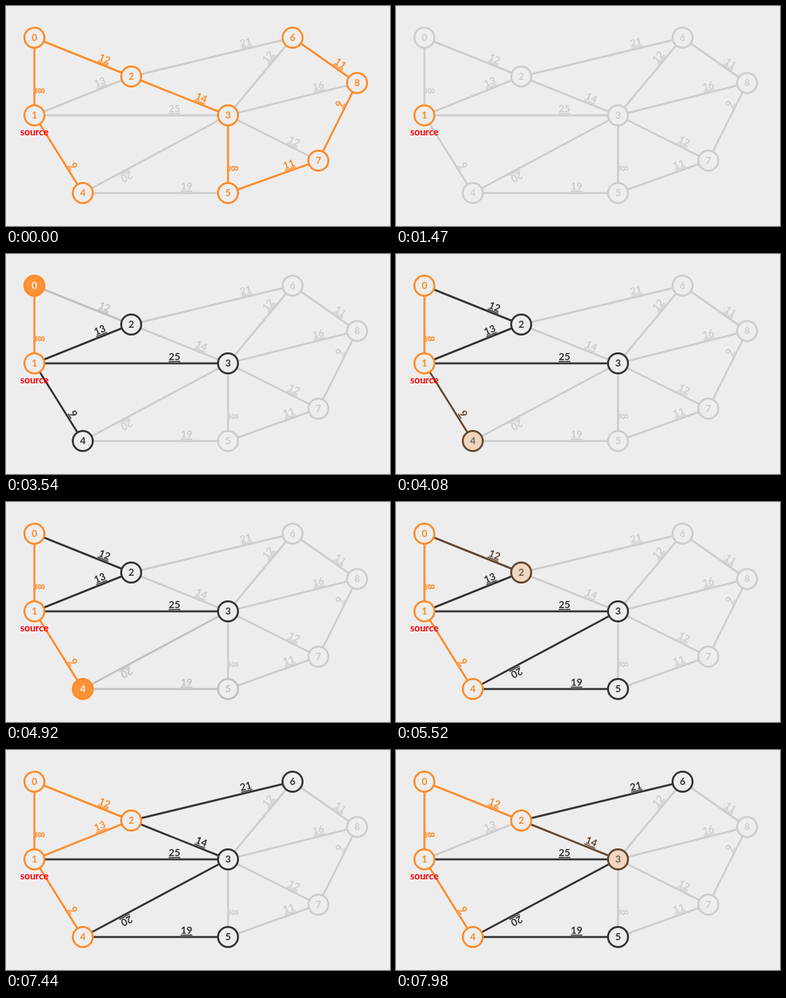
An HTML page that plays this animation: 595 px wide and 340 px high, repeating every 8 s.

```html
<!DOCTYPE html>
<html lang="en">
<head>
<meta charset="utf-8">
<title>Minimum spanning tree</title>
<style>
  html, body { margin: 0; width: 100%; height: 100%; overflow: hidden; background: #ededed; }
  svg { display: block; width: 595px; height: 340px; }
  text { font: 700 15px Lato, "Open Sans", sans-serif; text-anchor: middle; }
  line, circle { stroke-width: 3; }
  .edge line { stroke: currentColor; }
  .edge text { fill: currentColor; font-size: 15.5px; text-decoration: underline; }
  .source { fill: #f00; }
</style>
</head>
<body>
<svg id="stage" viewBox="0 0 595 340"></svg>
<script>
const LOOP = 8000, TICK = 30;
const GREY = [204, 204, 204], DARK = [51, 51, 51], ORANGE = [255, 138, 39];
const PAPER = [237, 237, 237], WHITE = [255, 255, 255];

// Each look is [outline, fill, ink]; edges use the outline only.
const LOOKS = {
  off: [GREY, PAPER, GREY],
  on: [DARK, PAPER, DARK],
  done: [ORANGE, PAPER, ORANGE],
  hot: [ORANGE, ORANGE, WHITE]
};

const NODES = [[44, 49], [44, 169], [194, 109], [344, 169], [119, 289],
               [344, 289], [444, 49], [484, 239], [544, 119]];

// Direction matters: the weight sits three quarters of the way along, on the left.
const EDGES = {
  '01': 8, '02': 12, '12': 13, '13': 25, '14': 9, '23': 14, '26': 21, '34': 20,
  '35': 8, '36': 12, '37': 12, '38': 16, '45': 19, '57': 11, '68': 11, '78': 9
};
const TREE = ['01', '02', '14', '23', '35', '57', '68', '78'];

// [first change, last change, { look: parts }]
const BEATS = [
  [1470, 1470, { off: Object.keys(EDGES).join(' ') + ' 0 2 3 4 5 6 7 8' }],
  [1980, 2310, { on: '01 12 13 14 0 2 3 4' }],
  [2550, 2820, { done: '01', hot: '0' }],
  [3540, 3870, { done: '0', on: '02' }],
  [4050, 4260, { done: '14', hot: '4' }],
  [4920, 5280, { done: '4', on: '34 45 5' }],
  [5490, 5730, { done: '02', hot: '2' }],
  [6420, 6750, { done: '2', on: '26 23 6' }],
  [6990, 7230, { done: '12' }],
  [7440, 7740, { off: '12' }],
  [7950, 8190, { done: '23', hot: '3' }]
];

const stage = document.getElementById('stage');
const parts = {};

function add(parent, tag, attrs, text) {
  const el = document.createElementNS('http://www.w3.org/2000/svg', tag);
  for (const k in attrs) el.setAttribute(k, attrs[k]);
  if (text !== undefined) el.textContent = text;
  return parent.appendChild(el);
}

function addEdge(id) {
  const [x1, y1] = NODES[id[0]], [x2, y2] = NODES[id[1]];
  const dx = x2 - x1, dy = y2 - y1, len = Math.hypot(dx, dy);
  const k = (16 + 0.75 * (len - 32)) / len;
  const angle = Math.atan2(dy, dx) * 180 / Math.PI;
  const g = add(stage, 'g', { class: 'edge' });
  add(g, 'line', { x1, y1, x2, y2 });
  add(g, 'text', {
    y: -4.7,
    transform: `translate(${x1 + dx * k} ${y1 + dy * k}) rotate(${angle})`
  }, EDGES[id]);
  parts[id] = {
    start: LOOKS[TREE.includes(id) ? 'done' : 'off'],
    paint: ([line]) => { g.style.color = line; }
  };
}

function addNode([x, y], id) {
  const ring = add(stage, 'circle', { cx: x, cy: y, r: 15.5 });
  const label = add(stage, 'text', { x, y: y + 5.2 }, id);
  parts[id] = {
    start: LOOKS.done,
    paint: ([line, fill, ink]) => {
      ring.style.stroke = line;
      ring.style.fill = fill;
      label.style.fill = ink;
    }
  };
}

Object.keys(EDGES).sort().forEach(addEdge);
NODES.forEach(addNode);
add(stage, 'text', { class: 'source', x: 44, y: 199.5 }, 'source');

const mix = (a, b, p) => a.map((v, i) => v + (b[i] - v) * p);
const rgb = c => `rgb(${c.map(Math.round).join(',')})`;

function draw() {
  const t = performance.now() % LOOP;
  const looks = {};
  for (const id in parts) looks[id] = parts[id].start;
  for (const [from, to, changes] of BEATS) {
    if (t < from) break;
    const step = Math.floor((t - from) / TICK) + 1;
    const p = Math.min(1, step * TICK / (to - from + TICK));
    for (const name in changes) {
      for (const id of changes[name].split(' ')) {
        looks[id] = looks[id].map((c, i) => mix(c, LOOKS[name][i], p));
      }
    }
  }
  for (const id in parts) parts[id].paint(looks[id].map(rgb));
  requestAnimationFrame(draw);
}
draw();
</script>
</body>
</html>
```
